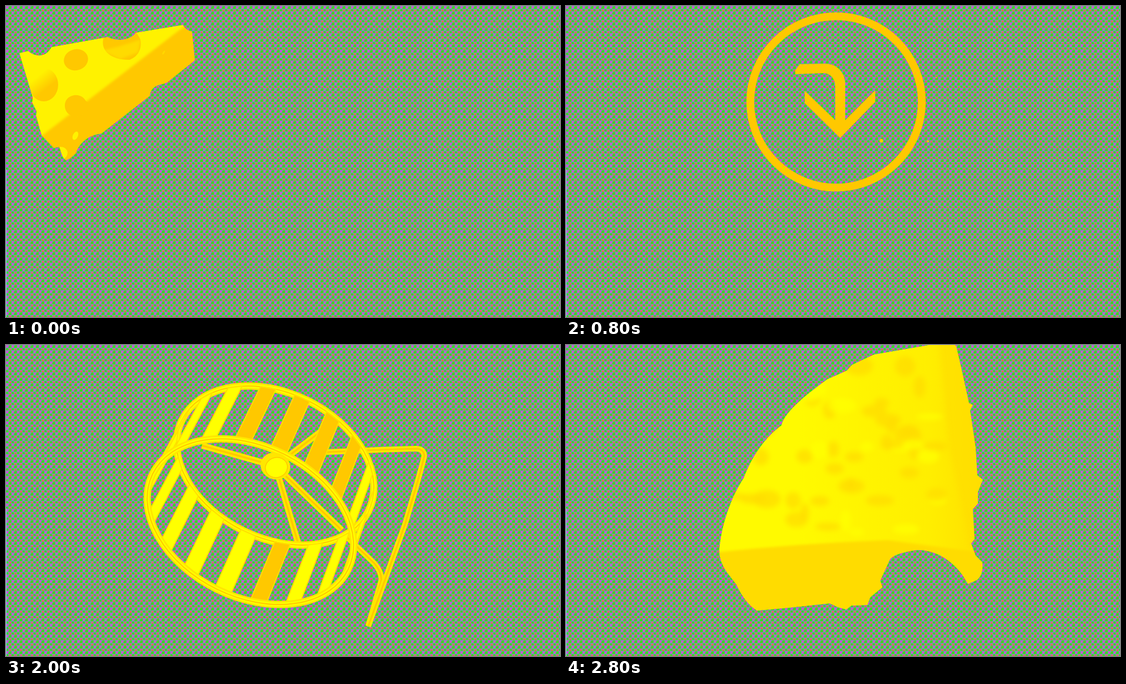
These frames come from a looping animation (998x561 px, 3 s). An HTML page:

```html
<!DOCTYPE html>
<html lang="en">
<head>
<meta charset="utf-8">
<title>Say cheese</title>
<style>
  html, body { margin: 0; width: 100%; height: 100%; overflow: hidden; }
  svg { display: block; width: 100vw; height: 100vh; }
</style>
</head>
<body>
<svg viewBox="0 0 998 561" preserveAspectRatio="none">
  <defs>
    <pattern id="dots" width="9.86" height="9.86" patternUnits="userSpaceOnUse">
      <rect width="9.86" height="9.86" fill="#7d8cdc"/>
      <path d="M5 1L9.86 0V5L7 6.5L4 5Z M0 6L3.4 5.2L5.2 9.2L1.5 9.86L0 8.6Z" fill="#3cd820"/>
      <path d="M2.5 0L5 2.5L2.5 5L0 2.5Z" fill="#e046cc"/>
      <path d="M7.4 5.2L9.86 7.2L7.4 9.8L4.9 7.2Z" fill="#e04ad0"/>
      <path d="M4.9 7.6H9.86L8 9.86H6.6Z" fill="#ef6a1c"/>
    </pattern>
    <linearGradient id="melt" x1="0" y1="0" x2=".5" y2="1">
      <stop offset=".1" stop-color="#ff9000"/><stop offset=".45" stop-color="#ffff10"/><stop offset="1" stop-color="#ff9a00"/>
    </linearGradient>
    <linearGradient id="fade" x1="0" y1="0" x2=".7" y2="1">
      <stop offset=".3" stop-color="#ffc800" stop-opacity="0"/><stop offset=".7" stop-color="#ffc800"/>
    </linearGradient>
    <linearGradient id="foamTone">
      <stop offset=".3" stop-color="#fffa00"/><stop offset=".8" stop-color="#ffee00"/><stop offset="1" stop-color="#ffe000"/>
    </linearGradient>
    <filter id="soft" x="-20%" y="-20%" width="140%" height="140%"><feGaussianBlur stdDeviation="2"/></filter>
    <filter id="blur"><feGaussianBlur stdDeviation="5"/></filter>

    <path id="wedgeShape" d="M24 85L40 81C50 90 70 96 82 74L183 56C200 65 225 62 234 48L319 34C322 41 328 45 335 46L340 98L290 138C280 143 262 140 259 162L172 230C150 232 132 246 126 265Q116 276 108 278C101 274 99 262 96 254L86 256L64 233L54 198L55 190L47 174L48 165Z"/>
    <clipPath id="wedgeClip"><use href="#wedgeShape"/></clipPath>
    <g id="wedge" clip-path="url(#wedgeClip)">
      <use href="#wedgeShape" fill="#fff200"/>
      <path d="M62 236L322 36L360 30V110L120 300Z" fill="#ffc800" filter="url(#soft)"/>
      <ellipse cx="126" cy="97" rx="22" ry="19" transform="rotate(-15 126 97)" fill="#ffc800"/>
      <ellipse cx="68" cy="142" rx="26" ry="30" fill="url(#fade)"/>
      <path d="M176 56C168 82 192 98 223 97C240 90 245 75 242 60L234 46Q205 66 183 56Z" fill="#ffc800"/>
      <path d="M172 80Q205 74 243 60L238 84L205 96Z" fill="#fff200" opacity=".45" filter="url(#soft)"/>
      <path d="M106 180C106 164 122 158 133 162C144 166 141 172 149 174C154 184 148 191 139 190L137 197C122 204 106 195 106 180Z" fill="#ffc800"/>
      <ellipse cx="125" cy="234" rx="4.5" ry="8" transform="rotate(25 125 234)" fill="#fff200"/>
      <path d="M96 254Q108 253 111 264Q110 274 103 276Z" fill="#fff200"/>
      <ellipse cx="284" cy="84" rx="1.5" ry="4" transform="rotate(30 284 84)" fill="#ffd800"/>
    </g>

    <path id="script" d="M349 190C362 182 366 170 364 160C368 185 388 184 387 206C384 228 354 232 343 220M387 218C398 215 408 206 412 196M470 143C440 136 410 172 409 198C412 216 444 203 470 148C462 170 453 195 462 198C475 198 490 176 500 146C490 166 488 184 500 184C515 180 525 152 530 122C530 160 515 215 496 250C485 265 472 258 478 240C485 215 532 190 562 130M388 334C398 318 381 315 366 340C348 370 346 396 368 394C400 390 452 292 447 245C440 222 424 270 420 320C416 350 414 387 424 385C425 360 442 325 460 322C475 322 454 365 472 368C500 366 544 322 540 304C528 290 499 332 508 352C524 366 556 338 575 310C602 296 608 286 596 282C575 285 558 340 570 350C592 352 622 306 625 265C624 290 650 308 637 328C625 336 612 332 608 325M637 328C662 324 704 286 709 262C698 250 656 296 664 318C678 332 706 310 721 275"/>
    <g id="sayCheese" fill="none" stroke-linecap="round" stroke-linejoin="round">
      <path d="M346 228Q372 246 404 234Q414 262 404 300L360 340Q346 372 358 392M470 262Q458 290 470 316M500 286Q570 286 606 284M640 278Q670 266 690 262M400 386H470" stroke="#33e000" stroke-width="17"/>
      <path d="M345 228Q370 242 400 222M520 330Q580 352 620 326Q660 330 700 310" stroke="#ff7a00" stroke-width="11"/>
      <g fill="url(#melt)">
        <path d="M400 212L436 165L460 172L466 198L500 184L530 132L548 148L520 215L486 258L480 204Q440 206 400 212Z"/>
        <path d="M424 260L441 246L434 318L486 348L470 370L424 372L388 364L390 346L412 332Z"/>
        <path d="M500 322L540 306L536 328L600 285L622 296L688 276L698 304L664 318L640 324L570 348L508 350Z"/>
      </g>
      <use href="#script" stroke="#ffd800" stroke-width="3" transform="translate(4 5)"/>
      <use href="#script" stroke="#e03cf4" stroke-width="7.5"/>
    </g>

    <g id="turnSign" fill="#ffc800">
      <circle cx="486.5" cy="173" r="154.5" fill="none" stroke="#ffc800" stroke-width="14"/>
      <path d="M413 123V116L421 105L466 104C490 104 503 122 503 140V206L557 152V173L494 238L430 175V153L485 206V146C485 132 478 122 464 121Z"/>
      <circle cx="568" cy="243" r="3.2"/><circle cx="652" cy="244" r="2"/><circle cx="667" cy="129" r="1"/>
    </g>

    <g id="oneWay" fill="#ffff00" stroke="#ffe000" stroke-width="1.5" stroke-linejoin="round" fill-rule="evenodd">
      <path d="M549 91L563 54L580 55L628 77L640 56L660 56L707 95L680 95L646 73L627 92L612 91L578 71L573 91Z"/>
      <path d="M424 52L517 55L519 62L470 92L464 105L458 92Z M450 63L491 64L468 82Z"/>
      <path d="M289 93L372 56L400 53L366 71L415 88L385 92L342 79L322 91Z"/>
      <path d="M271 120L384 116L362 178L275 179L276 174L332 172L339 151L276 148L277 143L341 140L345 125L272 124Z"/>
      <path d="M397 178L416 115L440 116L500 154L512 118L532 120L538 180L500 180L447 146L428 178Z"/>
      <path d="M555 122L672 118L701 181L605 180L570 168Z M588 126L646 125L667 173L610 171Z"/>
      <path d="M334 15H358M348 10L356 12M207 193L214 207L218 198M225 196H232M240 210L254 206M296 207L330 206M300 212H322M252 236L272 226M280 237H302M310 235H328M340 238L370 240M390 237H420M716 238H731M718 142L727 150M724 166L729 169M562 206L565 209M310 72L325 65" fill="none" stroke="#ffc800" stroke-width="4"/>
    </g>

    <path id="playLine" d="M381 196Q365 280 350 345M360 212C395 180 468 182 461 215C450 248 400 262 372 290M495 192C470 240 448 290 457 325C464 334 474 320 482 308M548 257C510 250 466 308 486 330C508 342 542 300 560 258C545 290 530 326 540 334C556 342 574 320 588 258C575 290 570 325 588 330C610 328 637 290 650 256C645 290 632 350 624 386"/>
    <g id="play" fill="none" stroke="#ffe000" stroke-linejoin="round">
      <use href="#playLine" stroke-width="7.5"/>
      <use href="#playLine" stroke-width="2" transform="translate(12 -7)"/>
      <use href="#playLine" stroke-width="4" stroke-dasharray="34 15" transform="translate(9 12)"/>
      <path d="M500 442L356 384Q338 376 338 396L343 436L510 515L676 430L679 392Q680 374 662 380L513 446" stroke-width="7"/>
      <path d="M498 454L360 396Q346 392 347 408L351 430L510 504L668 424L671 394M515 456L632 402M350 444L346 480" stroke-width="3.5"/>
    </g>

    <path id="foamShape" d="M555 17L648 1L690 -8L703 2L714 50L726 105L733 108L728 118L738 185L741 235L751 243L742 265V286L733 296L736 350L730 358L738 380L750 392Q752 415 740 424L724 431C700 385 660 368 630 370C604 374 585 380 582 390L566 425L570 437L548 455L543 469L514 470L505 477L490 473L475 466L400 474L344 479Q322 465 307 432L290 410Q276 390 276 370C280 320 300 270 320 240C335 200 360 165 388 145C394 118 440 85 470 62L506 46L515 36Z"/>
    <clipPath id="foamClip"><use href="#foamShape"/></clipPath>
    <g id="foam" clip-path="url(#foamClip)">
      <use href="#foamShape" fill="url(#foamTone)"/>
      <g id="blots" filter="url(#blur)"></g>
      <path d="M270 374Q420 358 580 352L760 376V500H270Z" fill="#ffdc00" filter="url(#soft)"/>
      <path d="M672 -10L690 180L730 370H770V-10Z" fill="#ffdc00" opacity=".55" filter="url(#blur)"/>
    </g>
    <g id="wheel"></g>
  </defs>
  <rect width="998" height="561" fill="url(#dots)"/>
  <path d="M.5 295V561" stroke="#80c8ff"/>
  <g id="stage"></g>
</svg>
<script>
const $ = id => document.getElementById(id);
const YELLOW = '#ffff00', AMBER = '#ffc800';
const STEP = 200;

// Two tilted rims joined by slats, with a bent wire stand.
function buildWheel() {
  const TILT = 42;
  const back = { x: 495, y: 345, rx: 187, ry: 131 };
  const front = { x: 566, y: 260, rx: 196, ry: 136 };
  const rad = d => d * Math.PI / 180;
  const at = (e, deg) => {
    const u = e.rx * Math.cos(rad(deg)), v = e.ry * Math.sin(rad(deg));
    const c = Math.cos(rad(TILT)), s = Math.sin(rad(TILT));
    return (e.x + u * c - v * s).toFixed(1) + ' ' + (e.y + u * s + v * c).toFixed(1);
  };
  const tube = (d, w) =>
    `<g fill="none" stroke-linejoin="round"><path d="${d}" stroke="#ffe600" stroke-width="${w}"/>` +
    `<path d="${d}" stroke="${AMBER}" stroke-width="${w * 0.3}"/></g>`;
  const rim = e => {
    const ring = (w, color) => `<ellipse rx="${e.rx}" ry="${e.ry}" fill="none" stroke="${color}" stroke-width="${w}" ` +
      `transform="translate(${e.x} ${e.y}) rotate(${TILT})"/>`;
    return ring(13, '#ffe600') + ring(7, YELLOW) + ring(2, AMBER);
  };
  const slat = a => {
    const amber = (a > 60 && a < 130) || (a > 240 && a < 260);
    return `<path d="M${at(back, a - 4.5)}L${at(front, a - 4.5)}L${at(front, a + 4.5)}L${at(back, a + 4.5)}Z" ` +
      `fill="${amber ? AMBER : YELLOW}" stroke="#ffe000" stroke-width="2"/>`;
  };
  const slats = Array.from({ length: 18 }, (_, i) => slat(7 + i * 20)).join('');
  return tube('M414 20L368 94Q364 108 372 126L408 188', 10) +
    tube('M414 20L300 178Q246 262 232 288Q230 300 242 304L300 319L400 343', 10) +
    tube('M495 344L494 190M495 344L412 200M495 344L612 416M495 344L390 385', 11) +
    rim(back) + slats + rim(front) +
    `<ellipse cx="495" cy="344" rx="27" ry="24" transform="rotate(35 495 344)" fill="#ffe600"/>` +
    `<ellipse cx="494" cy="341" rx="20" ry="18" fill="${YELLOW}" stroke="${AMBER}" stroke-width="1.5"/>`;
}

function buildBlots() {
  let seed = 11;
  const rnd = () => (seed = seed * 16807 % 2147483647) / 2147483647;
  return Array.from({ length: 54 }, (_, i) => {
    const x = 300 + rnd() * 370, y = 30 + rnd() * 310;
    return `<ellipse cx="${x}" cy="${y}" rx="${8 + rnd() * 18}" ry="${6 + rnd() * 14}" ` +
      `fill="${i % 3 ? '#ffdc00' : YELLOW}" opacity=".75"/>`;
  }).join('');
}

$('wheel').innerHTML = buildWheel();
$('blots').innerHTML = buildBlots();

const turn = deg => `rotate(${deg} 499 280.5)`;
const wheel = deg => [['wheel', turn(deg)]];
const scenes = [
  [['wedge']],
  [['wedge', 'rotate(180 491.5 282.7)']],
  [['sayCheese']],
  [['foam', `translate(20 32) ${turn(235)} translate(-35 -20) scale(1.07)`]],
  [['turnSign']],
  [['turnSign'], ['oneWay', 'translate(944.5 535) rotate(180)']],
  [['play']],
  wheel(265),
  wheel(0),
  wheel(82),
  wheel(164),
  wheel(33),
  [['oneWay'], ['play']],
  [['foam', turn(80)]],
  [['foam']]
];

$('stage').innerHTML = scenes.map(parts => '<g visibility="hidden">' +
  parts.map(([id, move = '']) => `<use href="#${id}" transform="${move}"/>`).join('') + '</g>').join('');
const layers = [...$('stage').children];

function draw(ms) {
  const now = Math.floor(ms / STEP) % layers.length;
  layers.forEach((g, i) => g.setAttribute('visibility', i === now ? 'visible' : 'hidden'));
}

const start = performance.now();
function tick() {
  draw(performance.now() - start);
  requestAnimationFrame(tick);
}
tick();
</script>
</body>
</html>
```
